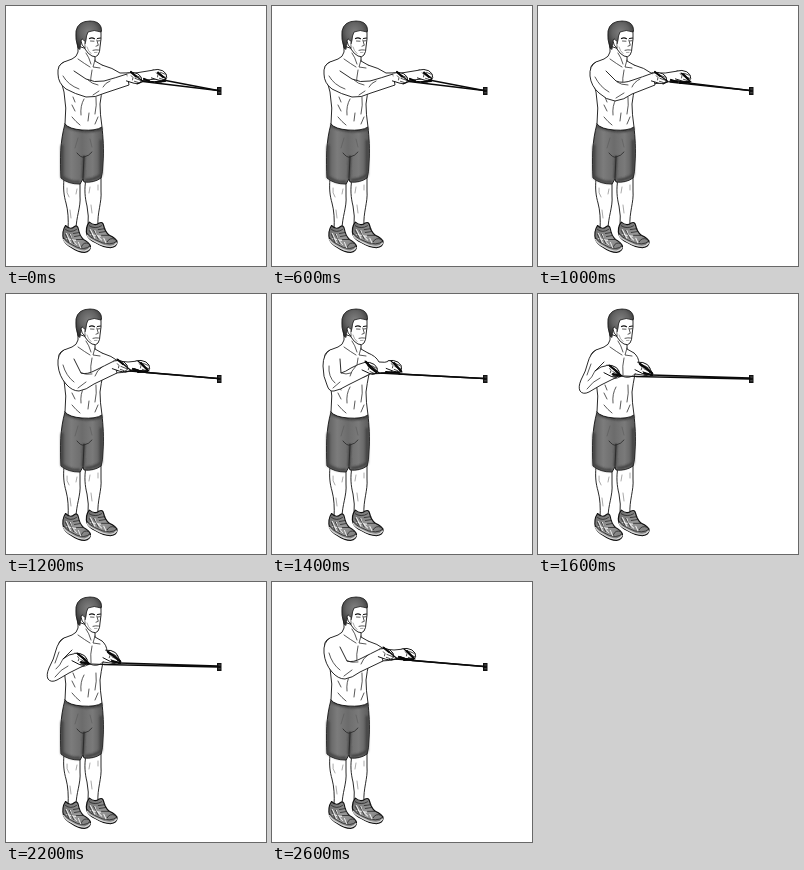
Write an HTML page that moves like this. It is 260x260 px and loops after 2800 ms.

```html
<!DOCTYPE html>
<html lang="en">
<head>
<meta charset="utf-8">
<title>Cable row</title>
<style>
html, body { margin: 0; width: 100%; height: 100%; overflow: hidden; background: #fff; }
svg { display: block; width: 100vw; height: 100vh; }
path { stroke-linecap: round; stroke-linejoin: round; }
.skin { fill: #fff; stroke: #111; stroke-width: .9; }
.line { fill: none; stroke: #222; stroke-width: .75; }
.fine { fill: none; stroke: #555; stroke-width: .5; }
.shade { fill: none; stroke: #3c3c3c; stroke-width: 2.4; filter: url(#soft); }
.cable { fill: none; stroke: #0a0a0a; stroke-width: 1.3; }
.grip { fill: none; stroke: #080808; stroke-width: 2.2; }
.strap { fill: none; stroke: #0a0a0a; stroke-width: 1.1; }
.solid { fill: #111; }
</style>
</head>
<body>
<svg viewBox="0 0 260 260">
  <defs>
    <filter id="soft" x="-30%" y="-30%" width="160%" height="160%"><feGaussianBlur stdDeviation="1.3"/></filter>
    <linearGradient id="cloth">
      <stop offset="0" stop-color="#5c5c5c"/><stop offset=".25" stop-color="#7c7c7c"/>
      <stop offset=".5" stop-color="#6c6c6c"/><stop offset=".75" stop-color="#7a7a7a"/>
      <stop offset="1" stop-color="#585858"/>
    </linearGradient>
    <radialGradient id="hair" cx=".5" cy=".4" r=".6">
      <stop offset="0" stop-color="#808080"/><stop offset=".55" stop-color="#636363"/><stop offset="1" stop-color="#353535"/>
    </radialGradient>
    <linearGradient id="shoe" x2="1" y2="1">
      <stop offset="0" stop-color="#666"/><stop offset=".5" stop-color="#989898"/><stop offset="1" stop-color="#777"/>
    </linearGradient>
  </defs>
  <g id="far"></g>
  <g id="body"></g>
  <g id="near"></g>
</svg>
<script>
const el = id => document.getElementById(id);
const path = (cls, d) => `<path class="${cls}" d="${d}"/>`;
const shape = (fill, d, w = .9) => `<path fill="${fill}" stroke="#111" stroke-width="${w}" d="${d}"/>`;

const shoe = (x, y, sx, sy) => `<g transform="translate(${x} ${y}) scale(${sx} ${sy})">` +
  shape('url(#shoe)', 'M3 0Q-1 6 1 14Q3 19 9 22Q16 27 22 27Q28 26 28 21Q27 17 21 14Q17 10 16 4Q15 -1 12 1Q8 5 3 0Z', 1.1) +
  `<path d="M1 14Q3 18 9 21Q16 25.500 22 25.500Q26 25 27.500 22" fill="none" stroke="#ddd" stroke-width="1.1"/>` +
  path('line', 'M3 4Q8 8 14 4M11 8L17 7M12 11L18 10M14 14L21 14M19 21Q21 16 26 18M1 12Q3 16 9 19Q15 23 21 23Q25 23 28 20') +
  `<path d="M4 8L8 17M8 9L9 13L14 19M4 13L13 15M16 17L18 22" fill="none" stroke="#eee" stroke-width="1"/>` +
  path('line', 'M3 9L6 16M7 9L11 18') + '</g>';

const legs =
  path('skin', 'M58 173C57 183 58 190 60 197Q63 208 62 224L70 224C70 211 75 201 74 190L74 175') +
  path('skin', 'M80 173C78 183 79 192 81 200Q83 210 82 220L92 220C91 207 96 196 95 185L95 170') +
  path('fine', 'M61 182Q60 187 63 191M71 183L70 188M64 204L65 212M84 181L83 187M92 179L92 184M85 199L86 207');

const shorts =
  shape('url(#cloth)', 'M59 118Q63 123 76 124Q90 125 96 121C97 130 98 144 97 157Q97 166 95 172Q88 177 78 176L77 173L74 178Q62 178 55 172C54 154 54 135 59 118Z') +
  path('shade', 'M60 120Q76 128 95 123M56 140L56 171Q65 177 73 176M95 135L95 169Q88 174 80 174M78 151L77 172') +
  path('line', 'M78 150L77 173M71 147Q75 152 78 151Q83 150 86 146') +
  path('fine', 'M72 132L69 142M84 133L86 141');

const torso =
  path('skin', 'M97 80Q95 90 94 98Q94 108 96 121Q90 125 76 124Q63 123 59 118Q61 102 58 86L53 67Q51 59 58 56L66 53Q71 51 72 46L72 40L84 44L89 50L89 55L96 59') +
  path('line', 'M72 53Q79 58 84 61M89 54L87 61L94 62M80 47Q83 51 85 58') +
  path('line', 'M86 64Q84 72 85 81M64 82Q73 88 84 82Q91 86 97 80') +
  path('line', 'M67 91L69 96M66 99L69 105M78 93Q74 100 75 109M90 91Q91 99 89 108M83 107L82 115M66 111Q70 116 74 119M92 111L89 118');

const head =
  path('skin', 'M78 26L79 43Q82 48 86 50Q90 52 92 49Q94 46 94 41L95 33L95 24Q88 20 78 26Z') +
  shape('url(#hair)', 'M72 42Q69 33 70 25Q72 15 84 15Q93 15 95 21Q96 24 95 26Q88 23 82 26Q80 30 80 34L79 38Q77 36 76 34Q74 37 74 43Z', .8) +
  path('skin', 'M78.500 35Q75.500 31 75 35Q75.500 40 78.500 41.500') +
  `<path d="M83.500 32.500Q86 31 88.500 32.700M91.500 32.500L94.500 32" fill="none" stroke="#111" stroke-width="1.2"/>` +
  path('line', 'M84.500 35L88 35.200M91.700 35L94 34.700M90.800 34L92.300 39.300L90 40.200M87 44.300Q90 43.500 92.500 44') +
  path('fine', 'M81 41Q82 45 85 47.500M88.500 46.500L91 46.400');

const anchor = `<path class="solid" d="M211 81H215.500V89H211Z"/>
  <path d="M212.600 83H214.200M212.600 86.800H214.200" stroke="#888" stroke-width=".6"/>`;

el('body').innerHTML = legs + shorts + shoe(56.500, 219.500, 1, 1) + shoe(80, 216, 1.11, .95) + torso + head + anchor;

// Curled fist, wrist on the left
const fist = (x, y, turn = 0) => `<g transform="translate(${x} ${y}) rotate(${turn})">` +
  path('skin', 'M-6 -4Q-1 -6.500 4 -5Q9 -3 9 1Q8 5 2 5L-6 4') +
  path('line', 'M2 -3L7 -2M2 0L8 1M2 3L6 3.500M-2 -2Q1 -1 0 2') + '</g>';

const arm = d => path('skin', d);
const cords = (...ends) => ends.map(([x, y]) => path('cable', `M${x} ${y}L212 84.500`)).join('');

const poses = {
  out: {
    far: arm('M96 59Q107 62 114 67Q131 68 148 64L150 73Q134 75 118 76L97 80') + fist(152, 69, 10),
    near: arm('M58 56Q51 59 52 68Q52 77 60 83Q69 88 80 91Q89 92 99 87L123 79L121 68Q109 72 98 75Q88 77 80 73L68 65') +
      path('line', 'M57 70Q62 79 73 83M82 74Q86 78 92 79M87 89L93 85M104 75Q99 77 97 81') +
      fist(127, 72, 10) + cords([137, 75.500], [157, 74]) +
      path('strap', 'M125 66L137 75.500L131 78M152 66L160 73L155 76L137 75') +
      path('grip', 'M125 66L130 70.500M138 73L143 75M152 67L157 71M150 76L159 75')
  },
  start: {
    far: arm('M96 59Q107 62 113 67Q128 68 140 65L142 74Q125 77 97 80') + fist(144, 70, 10),
    near: arm('M58 56Q51 60 52 70Q53 80 61 87Q68 94 77 95Q86 94 94 88L117 79L115 67Q104 71 95 74Q85 78 78 75L68 65') +
      path('line', 'M57 71Q62 81 71 86M79 76Q83 79 90 79M78 92L86 87M102 73Q96 76 94 81') +
      fist(120, 72, 10) + cords([132, 76], [150, 77]) +
      path('strap', 'M117 66L130 75.500L125 78M143 67L153 76L132 75') +
      path('grip', 'M117 66L122 70M133 74L139 76M145 68L150 73M142 77L151 76')
  },
  mid: {
    far: arm('M96 59Q106 62 112 67Q122 69 132 67L133 76Q117 79 97 80') + fist(135, 72, 12),
    near: arm('M58 56Q51 60 52 71Q53 82 60 90Q66 97 73 97Q80 96 88 90L111 79L108 67Q98 72 90 76Q81 81 75 79L68 65') +
      path('line', 'M57 71Q60 82 68 88M75 79Q80 81 86 80M72 94L80 88M96 73Q91 76 89 82') +
      fist(113, 72, 12) + cords([124, 77], [140, 78.500]) +
      path('strap', 'M111 65L125 76.500L119 78M132 67L143 77L125 76') +
      path('grip', 'M112 66L117 70M127 75L132 76.500M135 69L141 75.500M132 78L141 77.500')
  },
  close: {
    far: arm('M96 59Q104 62 107 68Q113 69 118 67L120 78Q109 80 97 80') + fist(121, 72, 14),
    near: arm('M58 56Q51 60 51 72Q51 83 55 91Q57 98 62 97Q68 96 76 91L98 80L94 68Q86 70 79 74Q73 78 69 79L68 65') +
      path('line', 'M57 72Q56 83 63 89M69 79Q74 81 79 79M61 94L68 88M84 72Q79 77 78 82') +
      fist(97, 74, 18) + cords([107, 79], [127, 80]) +
      path('strap', 'M93 67L107 79L100 80M119 67L130 78L109 79') +
      path('grip', 'M94 68L99 74L104 78M122 69L129 77M114 78L127 79')
  },
  pulled: {
    far: arm('M96 59Q101 63 101 70L111 74Q116 79 112 82L97 80'),
    near: arm('M58 56Q52 60 50 68Q48 77 43 86Q40 93 42 97Q45 101 51 98L63 91L79 83L76 73Q69 70 63 73L57 77L66 68') +
      path('line', 'M57 77Q54 84 50 87M49 95Q55 87 62 84M53 70L49 81') +
      fist(73, 77, 20) + fist(104, 74, 20) +
      path('strap', 'M84 82L99 82.500') + path('cable', 'M98 82.500L212 85.200M113 81L212 84') +
      path('strap', 'M71 71L84 82L75 82M101 69L115 80L106 81') +
      path('grip', 'M72 72L77 76L82 81M75 80L82 82M102 70L108 74L114 79M106 79L114 81')
  }
};

// Each pose holds until its end time, then cuts
const steps = [[1000, 'out'], [1200, 'start'], [1400, 'mid'], [1600, 'close'], [2600, 'pulled'], [2800, 'mid']];
const loop = 2800;
let shown;

function draw(t) {
  const name = steps.find(([end]) => t < end)[1];
  if (name === shown) return;
  shown = name;
  el('far').innerHTML = poses[name].far;
  el('near').innerHTML = poses[name].near;
}

const t0 = performance.now();
function tick() {
  draw((performance.now() - t0) % loop);
  requestAnimationFrame(tick);
}
tick();
</script>
</body>
</html>
```
